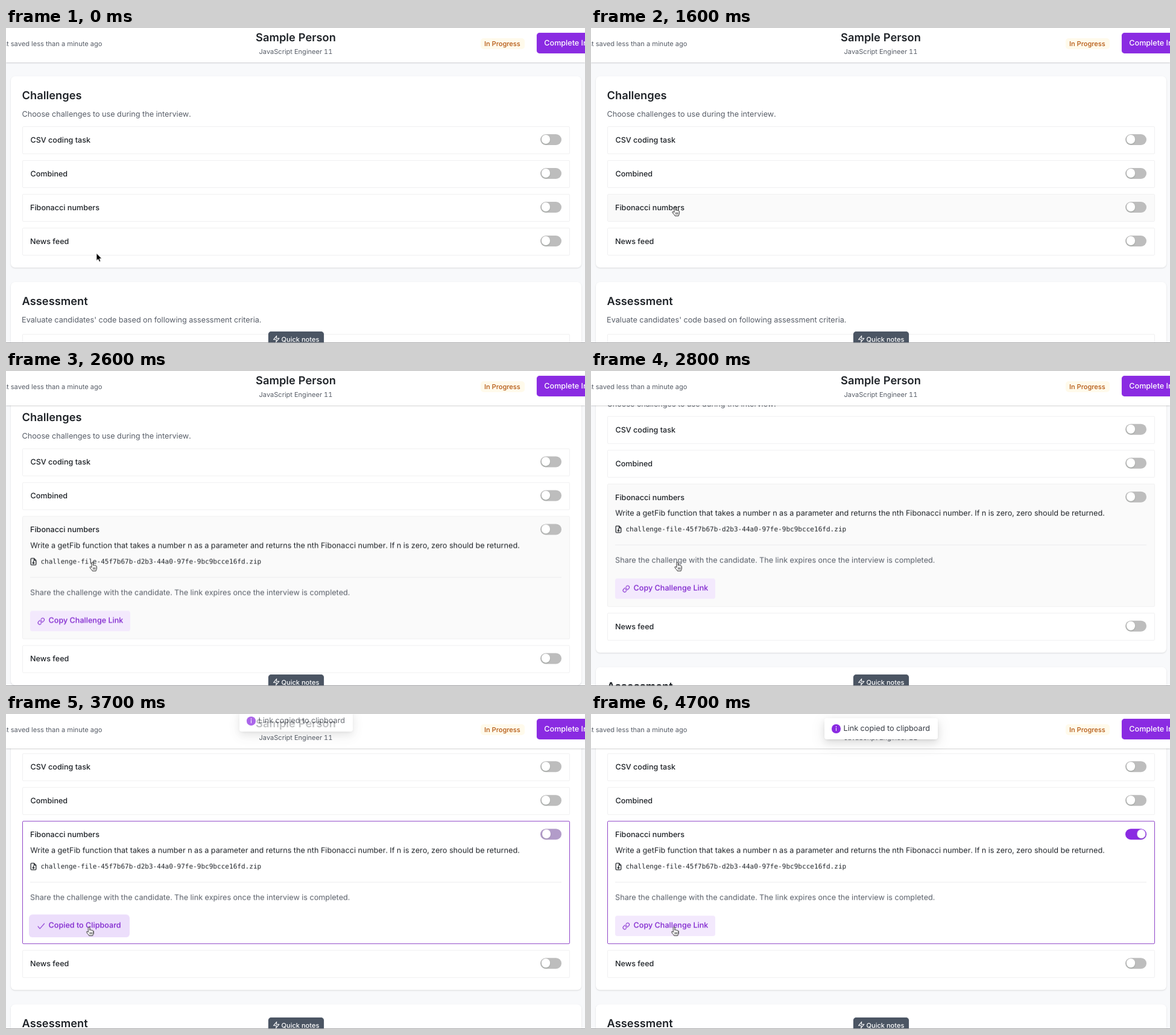
An HTML page for the animation above (5360 ms loop, 960 by 522 pixels).

```html
<!DOCTYPE html>
<html lang="en">
<head>
<meta charset="utf-8">
<title>Interview challenges</title>
<style>
  :root { --purple: #8a2be2; --ink: #1f2328; --muted: #585e68; }
  * { box-sizing: border-box; margin: 0; }
  html, body { width: 100%; height: 100%; overflow: hidden; }
  body {
    position: relative; background: #f8f9fb; color: var(--ink);
    font: 12.7px/20px Inter, sans-serif;
    font-variant-numeric: tabular-nums;
    text-rendering: geometricPrecision;
  }
  .stage { position: absolute; left: 0; top: 0; width: 960px; height: 522px; overflow: hidden; }

  /* --x: left edge, --y: vertical centre of the line */
  .t { position: absolute; left: calc(var(--x) * 1px); top: calc(var(--y) * 1px - 10px); white-space: nowrap; }
  .medium { font-weight: 500; font-size: 12.6px; }
  .small { font-size: 11.05px; }
  .muted { color: var(--muted); }
  h1, h2 { font-size: 18.3px; font-weight: 600; }
  svg { fill: none; stroke: currentColor; stroke-width: 2; stroke-linecap: round; stroke-linejoin: round; }

  header {
    position: absolute; left: 0; top: 0; width: 960px; height: 57px;
    background: #fff; box-shadow: 0 1px 2px rgba(0, 0, 0, .18);
  }
  header .mid { left: 0; width: 961px; text-align: center; }
  header .saved { left: auto; right: 800.5px; font-size: 11.13px; }
  .status { position: absolute; left: 787px; top: 17px; width: 73px; height: 18px; border-radius: 5px; background: #fffaeb; }
  .status b { font-weight: 500; color: #b4560f; }
  .finish { position: absolute; left: 880px; top: 8px; width: 140px; height: 34px; border-radius: 5px; background: var(--purple); color: #fff; box-shadow: 0 0 1px var(--purple); }

  .card {
    position: relative; width: 946px; margin-left: 8px; padding: 83px 19px 19.5px;
    border-radius: 7px; background: #fff; box-shadow: 0 1px 2.5px rgba(0, 0, 0, .13);
  }
  .page { position: absolute; left: 0; top: 80px; }
  .card + .card { margin-top: 24.5px; height: 420px; }
  .row { position: relative; width: 908px; height: 46px; margin-bottom: 10px; border: 1px solid #f0f0f1; border-radius: 2px; background: #fff; overflow: hidden; }
  .row:last-child { margin-bottom: 0; }
  .card + .card .row { height: 200px; margin-top: 3px; }
  .switch { position: absolute; right: 13px; top: 11.8px; width: 35px; height: 18px; border-radius: 9px; background: #bdbdbd; }
  .switch::after {
    content: ""; position: absolute; left: 1.7px; top: 1.7px; width: 14.4px; height: 14.4px;
    border-radius: 50%; background: #fff; box-shadow: 0 1px 2px rgba(0, 35, 11, .2);
  }
  .file { font-family: "DejaVu Sans Mono", monospace; }
  .rule { position: absolute; left: 12px; right: 13px; top: 100px; height: 1px; background: #ebebed; }
  .btn {
    position: absolute; left: 12px; top: 155.5px; height: 34.5px; padding: 1px 12px 0; border-radius: 4px;
    display: flex; align-items: center; gap: 6px; white-space: nowrap;
    color: #7e22ce; background: #f3e9fd;
  }

  .notes { position: absolute; left: 435px; top: 503px; width: 91.5px; height: 30px; border-radius: 5px; background: #4b5563; color: #fff; box-shadow: 0 0 1px #4b5563; }
  .edge { position: absolute; left: 0; top: 521px; width: 960px; height: 1px; background: #a5a5a7; }
  .toast {
    position: absolute; left: 386.5px; top: 7px; width: 188.5px; height: 35px; border-radius: 4px; background: #fff; color: #363b44;
    box-shadow: 0 2px 5px -2px rgba(0, 0, 0, .14), 0 5px 14px rgba(0, 0, 0, .1), 0 7px 22px 6px rgba(0, 0, 0, .05);
  }
  .info { position: absolute; left: 12.5px; top: 10px; width: 14.5px; height: 14.5px; border-radius: 50%; background: var(--purple); }
  .info::before, .info::after { content: ""; position: absolute; left: 6.5px; width: 1.5px; background: #fff; }
  .info::before { top: 3.4px; height: 1.6px; }
  .info::after { top: 6.2px; height: 5px; }
  .cursor { position: absolute; left: 0; top: 0; }
  .cursor svg { position: absolute; left: 0; top: 0; overflow: visible; }
  .cursor .hand { left: -1px; }

  /* one shared clock: a 5.36 s loop, 100 ms = 1.8657 % */
  .page, .news, .fib, .details, .fib .switch, .fib .switch::after, .link, .done, .toast, .cursor, .hand, .arrow {
    animation: 5360ms step-end infinite;
  }
  .page { animation-name: scroll; }
  .news { animation-name: news; }
  .fib { animation-name: fib; }
  .details { animation-name: details; }
  .fib .switch { animation-name: track; }
  .fib .switch::after { animation-name: knob; }
  .link { animation-name: link; }
  .done { animation-name: done; }
  .toast { animation-name: toast; }
  .cursor { animation-name: move; }
  .hand { animation-name: hand; }
  .arrow { animation-name: arrow; }

  @keyframes scroll {
    0% { transform: none; }
    46.64% { transform: translateY(-12px); }
    48.5% { transform: translateY(-34.6px); }
    50.37% { transform: translateY(-66px); }
    52.23% { transform: translateY(-88.3px); }
    54.1% { transform: translateY(-95px); }
    55.97%, 100% { transform: translateY(-97.8px); }
  }
  @keyframes news {
    0% { background: #fff; }
    1.86% { background: #fafafa; }
    16.79%, 100% { background: #fff; }
  }
  @keyframes fib {
    0% { height: 46px; background: #fff; border-color: #f0f0f1; }
    18.65% { height: 46px; background: #fafafa; border-color: #f0f0f1; }
    31.71% { height: 204px; background: #fafafa; border-color: #f0f0f1; }
    69.02%, 100% { height: 204px; background: #fff; border-color: #8f45c8; }
  }
  @keyframes details {
    0% { opacity: 0; }
    31.71%, 100% { opacity: 1; }
  }
  @keyframes track {
    0% { background: #bdbdbd; }
    69.02% { background: #b29cc9; }
    70.89% { background: #9651d8; }
    72.76%, 100% { background: #8a2be2; }
  }
  @keyframes knob {
    0% { transform: none; }
    69.02% { transform: translateX(1px); }
    70.89% { transform: translateX(13px); }
    72.76%, 100% { transform: translateX(17.4px); }
  }
  @keyframes link {
    0% { opacity: 1; }
    69.02% { opacity: 0; }
    87.68%, 100% { opacity: 1; }
  }
  @keyframes done {
    0% { opacity: 0; background: #ecdefb; box-shadow: none; }
    69.02% { opacity: 1; background: #ecdefb; box-shadow: 0 0 0 2px #ecdefb; }
    70.89% { opacity: 1; background: #f1e5fc; box-shadow: 0 0 0 4px rgba(138, 43, 226, .08); }
    72.76% { opacity: 1; background: #f3e9fd; box-shadow: 0 0 0 4.6px rgba(138, 43, 226, .03); }
    74.62% { opacity: 1; background: #f3e9fd; box-shadow: none; }
    87.68%, 100% { opacity: 0; background: #f3e9fd; box-shadow: none; }
  }
  @keyframes toast {
    0% { opacity: 0; transform: translateY(-35px); }
    69.02% { opacity: .72; transform: translateY(-12.8px); }
    70.89% { opacity: .95; transform: translateY(-2.5px); }
    72.76%, 100% { opacity: 1; transform: none; }
  }
  @keyframes move {
    0% { transform: translate(150px, 373.5px); }
    1.86% { transform: translate(148px, 366px); }
    3.73% { transform: translate(148px, 361px); }
    5.59% { transform: translate(147px, 358px); }
    7.46% { transform: translate(146px, 356px); }
    13.05% { transform: translate(143px, 349px); }
    14.92% { transform: translate(137px, 337px); }
    16.79% { transform: translate(131px, 325px); }
    18.65% { transform: translate(128px, 314px); }
    20.52% { transform: translate(130px, 306px); }
    22.38% { transform: translate(133px, 300px); }
    24.25% { transform: translate(135px, 296px); }
    35.44% { transform: translate(135px, 298px); }
    37.31% { transform: translate(136px, 303px); }
    39.17% { transform: translate(138px, 309px); }
    41.04% { transform: translate(139px, 314px); }
    42.91% { transform: translate(139px, 316px); }
    57.83% { transform: translate(138px, 325px); }
    59.7% { transform: translate(135px, 343px); }
    61.56%, 100% { transform: translate(133.5px, 352px); }
  }
  @keyframes hand {
    0% { opacity: 0; }
    1.86% { opacity: 1; }
    16.79% { opacity: 0; }
    18.65%, 100% { opacity: 1; }
  }
  @keyframes arrow {
    0% { opacity: 1; }
    1.86% { opacity: 0; }
    16.79% { opacity: 1; }
    18.65%, 100% { opacity: 0; }
  }
</style>
</head>
<body>
<div class="stage">
  <main class="page">
    <section class="card">
      <h2 class="t" style="--x:18.5;--y:32">Challenges</h2>
      <p class="t muted" style="--x:18.4;--y:64">Choose challenges to use during the interview.</p>
      <div class="row"><p class="t medium" style="--x:12.4;--y:22.6">CSV coding task</p><i class="switch"></i></div>
      <div class="row"><p class="t medium" style="--x:12.4;--y:22.6">Combined</p><i class="switch"></i></div>
      <div class="row fib">
        <p class="t medium" style="--x:12;--y:22.6">Fibonacci numbers</p><i class="switch"></i>
        <div class="details">
          <p class="t" style="--x:12.2;--y:49.3">Write a getFib function that takes a number n as a parameter and returns the nth Fibonacci number. If n is zero, zero should be returned.</p>
          <svg class="t" style="--x:11.3;--y:78" width="13" height="13" viewBox="0 0 24 24"><path d="M14 2H6a2 2 0 0 0-2 2v16a2 2 0 0 0 2 2h12a2 2 0 0 0 2-2V8zM14 2v6h6M12 10v8M9 15l3 3 3-3" stroke-width="2.3"/></svg>
          <p class="t small file" style="--x:29.4;--y:74.6">challenge-file-45f7b67b-d2b3-44a0-97fe-9bc9bcce16fd.zip</p>
          <div class="rule"></div>
          <p class="t muted" style="--x:12;--y:127.3">Share the challenge with the candidate. The link expires once the interview is completed.</p>
          <div class="btn medium link">
            <svg width="12.6" height="12.6" viewBox="0 0 24 24"><path d="M10 13a5 5 0 0 0 7.54.54l3-3a5 5 0 0 0-7.07-7.07l-1.72 1.71M14 11a5 5 0 0 0-7.54-.54l-3 3a5 5 0 0 0 7.07 7.07l1.71-1.71"/></svg>
            Copy Challenge Link
          </div>
          <div class="btn medium done">
            <svg width="12.6" height="12.6" viewBox="0 0 24 24"><path d="M2 13l6 7L22 4"/></svg>
            Copied to Clipboard
          </div>
        </div>
      </div>
      <div class="row news"><p class="t medium" style="--x:12;--y:22.6">News feed</p><i class="switch"></i></div>
    </section>
    <section class="card">
      <h2 class="t" style="--x:18.6;--y:32">Assessment</h2>
      <p class="t muted" style="--x:18;--y:64">Evaluate candidates' code based on following assessment criteria.</p>
      <div class="row"></div>
    </section>
  </main>

  <header>
    <p class="t muted saved" style="--y:25.5">Last saved less than a minute ago</p>
    <h1 class="t mid" style="--y:15.5">Sample Person</h1>
    <p class="t small muted mid" style="--y:38.5">JavaScript Engineer 11</p>
    <div class="status"><b class="t small" style="--x:6;--y:8.7">In Progress</b></div>
    <div class="finish"><p class="t medium" style="--x:12.3;--y:18">Complete Interview</p></div>
  </header>

  <div class="notes">
    <svg class="t" style="--x:6.5;--y:16.2" width="12.5" height="12.5" viewBox="0 0 24 24"><path d="M13 2L3 14h9l-1 8 10-12h-9z"/></svg>
    <p class="t medium small" style="--x:21.5;--y:13">Quick notes</p>
  </div>
  <div class="edge"></div>

  <div class="toast"><i class="info"></i><p class="t" style="--x:32;--y:18">Link copied to clipboard</p></div>

  <div class="cursor">
    <svg class="arrow" width="11" height="16" stroke="none"><path d="M0 0V12.2L2.8 9.6 4.7 14 6.9 13.1 5 8.8H8.8Z" fill="#000" stroke="#fff" stroke-width=".8"/></svg>
    <svg class="hand" width="13" height="16"><path d="M4 9V2.2a1.3 1.3 0 0 1 2.6 0V6.2c.3-.7 2-.6 2.2.3.5-.6 1.7-.4 1.9.5.6-.4 1.6 0 1.6 1v3c0 2-.9 2.6-1.1 4.3H5.2C4.8 13.6 2 11.6 1 9.6.6 8.6 1.6 8 2.4 8.5z" fill="#fff" stroke="#111" stroke-width=".9"/><path d="M6.6 9.8v3M8.3 9.8v3M10 9.8v3" stroke="#111" stroke-width=".7"/></svg>
  </div>
</div>
</body>
</html>
```
